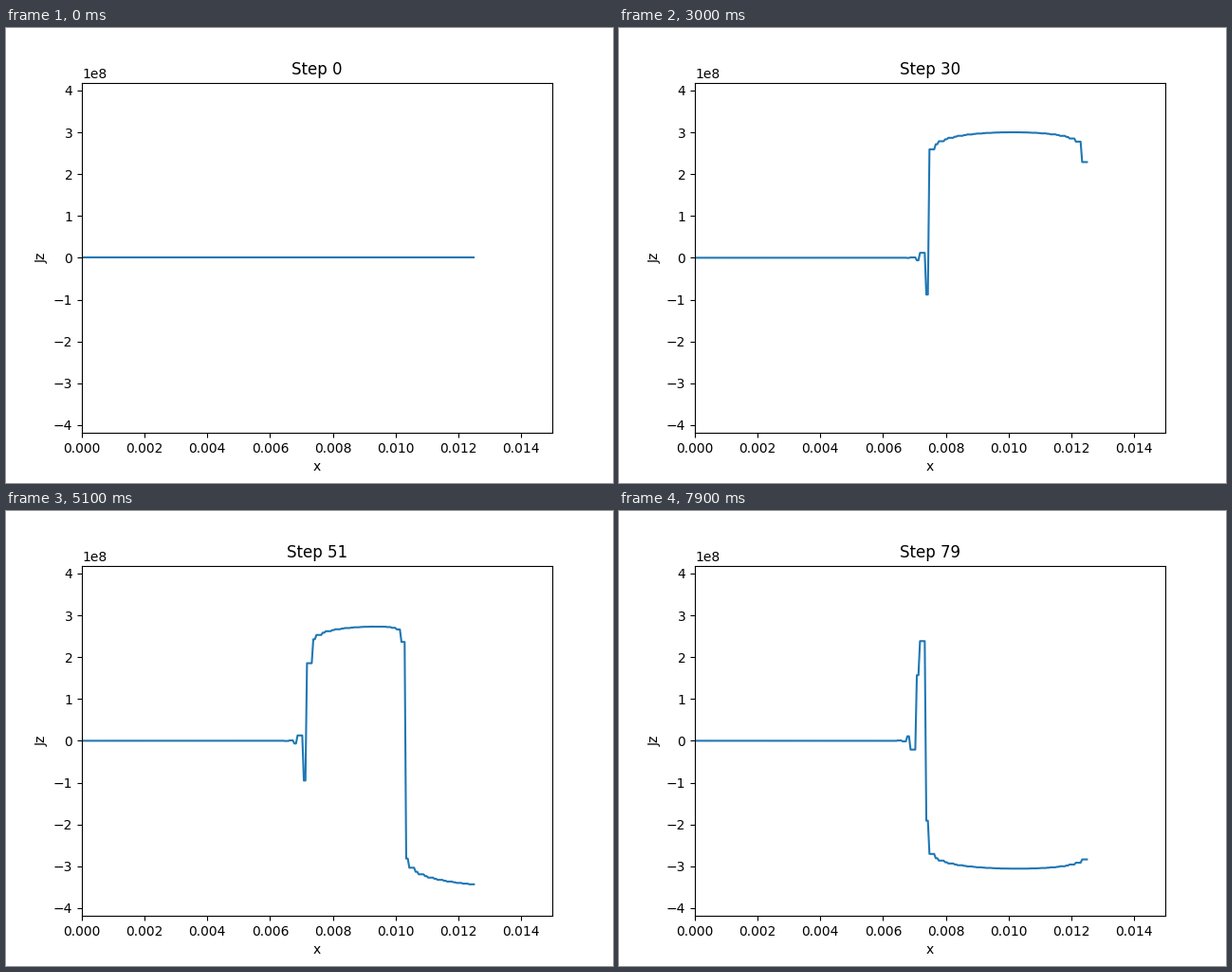
These frames come from a looping animation (640x480 px, 8 s). A matplotlib script:

```python
import numpy as np
import matplotlib.pyplot as plt
from matplotlib.animation import FuncAnimation

# AC transport current in a round superconductor: power-law E(J),
# radial finite elements for u = r * h, implicit Euler in time.
MU0 = 4e-7 * np.pi
R = 0.0125
JC, EC, N = 2.95e8, 1e-4, 20
U_MAX = 0.65 * 3e8 * R**2 / 2
PERIOD = 10.0
STEPS, DT, SUB = 80, 0.1, 2


def make_edges():
    """Cell borders: alternating wide and narrow cells."""
    wide = 0.007061 + 0.0002973 * np.arange(-23, 17)
    pairs = np.column_stack([wide, wide + 0.00011]).ravel()
    return np.concatenate([[0], pairs, [0.01212, 0.0123, R]])


edges = make_edges()
width = np.diff(edges)
mid = (edges[1:] + edges[:-1]) / 2
vol = width * mid

B = np.diff(np.eye(len(edges)), axis=0)
P = np.abs(B)
m = width / (6 * mid)
MASS = (P.T * m) @ P + np.diag(P.T @ m)


def current_density(u):
    return B @ u / vol


def solve_step(u0, boundary, dt):
    """One implicit step: damped Newton on the convex energy."""
    k = MU0 / dt * MASS
    free = slice(1, -1)

    def energy(u):
        d = u - u0
        phi = np.abs(current_density(u) / JC) ** (N + 1)
        return d @ k @ d / 2 + EC * JC / (N + 1) * (phi @ vol)

    u = u0.copy()
    u[-1] = boundary
    e = energy(u)
    for _ in range(150):
        q = current_density(u) / JC
        p = np.abs(q) ** (N - 1)
        grad = (k @ (u - u0) + B.T @ (EC * p * q))[free]
        hess = k + (B.T * (EC * N * p / JC / vol)) @ B
        s = np.zeros_like(u)
        s[free] = np.linalg.solve(hess[free, free], -grad)
        slope = grad @ s[free]
        t = 1.0
        e_new = energy(u + s)
        while e_new > e + 1e-4 * t * slope and t > 1e-6:
            t /= 2
            e_new = energy(u + t * s)
        if t <= 1e-6:
            break
        u, e = u + t * s, e_new
        if np.abs(s).max() < 1e-7 * U_MAX:
            break
    return u


def simulate():
    u = np.zeros(len(edges))
    history = [current_density(u)]
    dt = DT / SUB
    for i in range(1, (STEPS - 1) * SUB + 1):
        u = solve_step(u, U_MAX * np.sin(2 * np.pi * i * dt / PERIOD), dt)
        if i % SUB == 0:
            history.append(current_density(u))
    return history


history = simulate()
x = np.linspace(0, R, 250)
cell = np.clip(np.searchsorted(edges, x, side="right") - 1, 0, len(mid) - 1)

fig, ax = plt.subplots(figsize=(6.4, 4.8), dpi=100)
line, = ax.plot(x, np.zeros_like(x), color="#1f77b4", lw=1.5)
ax.set_xlim(0, 0.015)
ax.set_ylim(-4.19e8, 4.19e8)
ax.set_xlabel("x")
ax.set_ylabel("Jz")
title = ax.set_title("Step 0")


def update(step):
    line.set_ydata(history[step][cell])
    title.set_text(f"Step {step}")
    return line, title


anim = FuncAnimation(fig, update, frames=STEPS, interval=100, repeat=True,
                     repeat_delay=0, blit=False)
plt.show()
```
